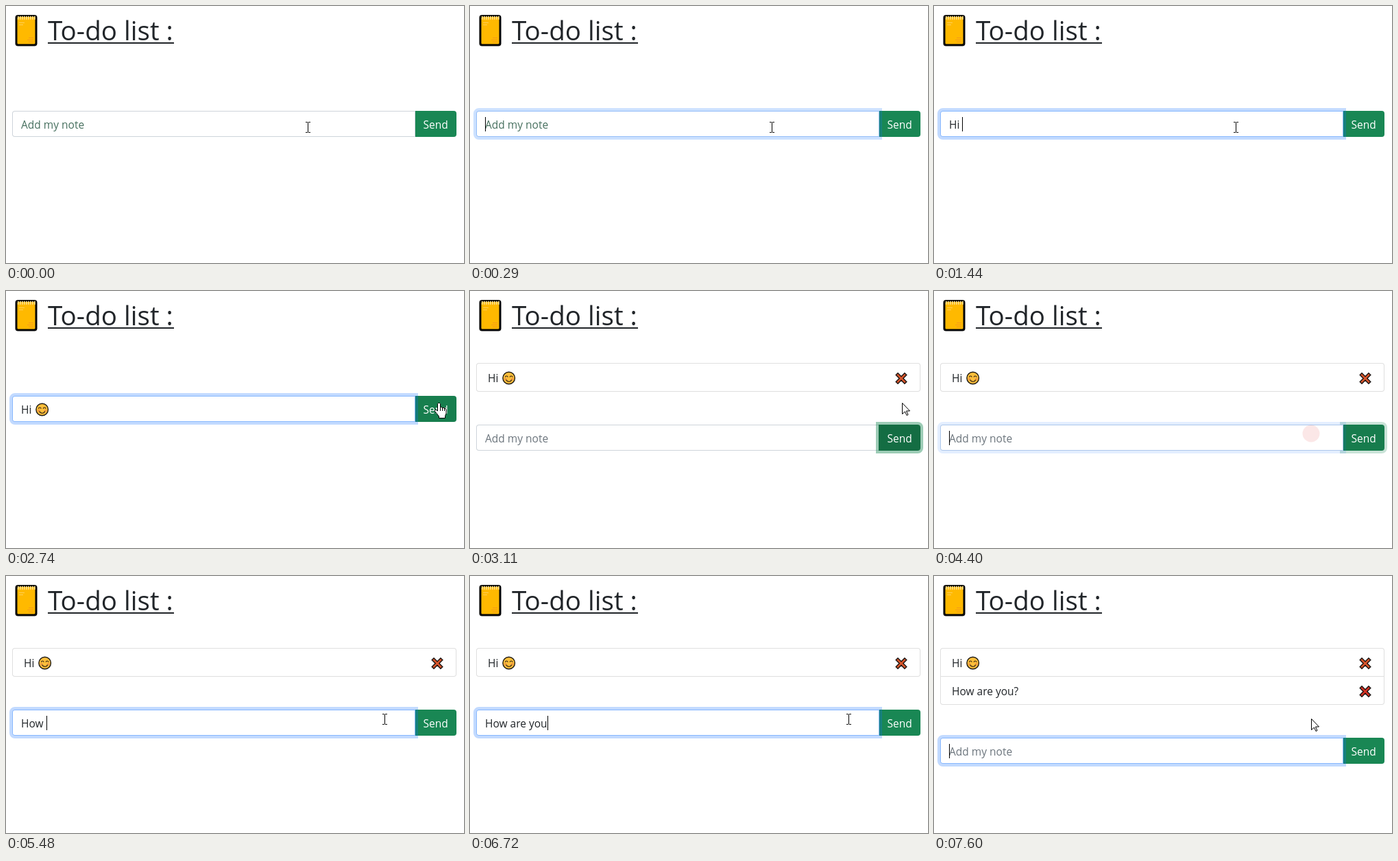
Recreate the animation shown at these times as an HTML page with a canvas. Size 668 px wide and 375 px high, loop 8000 ms.

```html
<!DOCTYPE html>
<html lang="en">
<head>
<meta charset="utf-8">
<title>To-do list</title>
<style>
  html, body { margin: 0; width: 100%; height: 100%; overflow: hidden; background: #fff; }
  canvas { display: block; width: 668px; height: 375px; }
</style>
</head>
<body>
<canvas id="stage" width="668" height="375"></canvas>
<script>
const ctx = document.getElementById('stage').getContext('2d');
const LOOP = 8000;
const FONT = '"Open Sans", "Noto Sans", sans-serif';
const BODY_FONT = `15.5px ${FONT}`;
const INK = '#212529';
const SMILE = '😊';

const FIRST_FOCUS = 180, SEND_DOWN = 2980, FIRST_SENT = 3080;
const SECOND_FOCUS = 4330, SECOND_SENT = 7600;
const CLICKS = [[110, 260], [SEND_DOWN, FIRST_SENT], [4310, 4430]];

const KEYS = [
  [920, 'H'], [1200, 'i'], [1440, ' '], [1770, SMILE],
  [5010, 'H'], [5260, 'o'], [5350, 'w'], [5480, ' '],
  [5600, 'a'], [5780, 'r'], [5950, 'e'], [5980, ' '],
  [6390, 'y'], [6470, 'o'], [6720, 'u'], [7030, '?']
];

const clamp = v => Math.min(1, Math.max(0, v));
const smooth = u => u * u * (3 - 2 * u);
const fade = (t, start, length = 150) => smooth(clamp((t - start) / length));
const mix = (a, b, u) => `rgb(${a.map((v, i) => Math.round(v + (b[i] - v) * u))})`;

function box(x, y, w, h, radii, fill) {
  ctx.beginPath();
  ctx.roundRect(x, y, w, h, radii);
  ctx.fillStyle = fill;
  ctx.fill();
}

function ring(x, y, w, h, radii, color) {
  ctx.beginPath();
  ctx.roundRect(x - 4, y - 4, w + 8, h + 8, radii.map(r => r && r + 4));
  ctx.roundRect(x, y, w, h, radii);
  ctx.fillStyle = color;
  ctx.fill('evenodd');
}

function shape(points, fill, stroke, width = 1) {
  ctx.beginPath();
  points.forEach(([x, y]) => ctx.lineTo(x, y));
  ctx.closePath();
  ctx.fillStyle = fill;
  ctx.fill();
  ctx.strokeStyle = stroke;
  ctx.lineWidth = width;
  ctx.stroke();
}

function arc(x, y, r, from, to, color, width) {
  ctx.beginPath();
  ctx.arc(x, y, r, from, to);
  ctx.strokeStyle = color;
  ctx.lineWidth = width;
  ctx.stroke();
}

function disc(x, y, r, color) {
  ctx.beginPath();
  ctx.arc(x, y, r, 0, Math.PI * 2);
  ctx.fillStyle = color;
  ctx.fill();
}

function smiley(x, y) {
  disc(x, y, 9, '#fdbf3b');
  disc(x - 5, y + 1.8, 2, '#f29a3f');
  disc(x + 5, y + 1.8, 2, '#f29a3f');
  arc(x, y, 8.8, 0, Math.PI * 2, '#1d1a16', 1.4);
  arc(x - 3.4, y - 1.2, 1.8, Math.PI, Math.PI * 2, '#3b2a18', 1.2);
  arc(x + 3.4, y - 1.2, 1.8, Math.PI, Math.PI * 2, '#3b2a18', 1.2);
  arc(x, y + 1, 4.2, 0.35, Math.PI - 0.35, '#3b2a18', 1.3);
}

// Draws text with an optional smiley and returns the x where it ends.
function line(text, x, baseline, color = INK) {
  ctx.font = BODY_FONT;
  ctx.fillStyle = color;
  const plain = text.replace(SMILE, '');
  ctx.fillText(plain, x, baseline);
  x += ctx.measureText(plain).width;
  if (plain === text) return x;
  smiley(x + 11.3, baseline - 6);
  return x + 22.5;
}

function cross(x, y, color) {
  ctx.save();
  ctx.translate(x, y);
  ctx.rotate(Math.PI / 4);
  const a = 2, b = 9;
  shape([[-a, -b], [a, -b], [a, -a], [b, -a], [b, a], [a, a],
         [a, b], [-a, b], [-a, a], [-b, a], [-b, -a], [-a, -a]], color, '#1c1412', 1.4);
  ctx.restore();
}

function notepad() {
  box(13.5, 13, 32, 45.5, 4, '#050505');
  box(16.5, 16, 26, 39.5, 1.5, '#ffb900');
  for (let x = 17; x < 43; x += 3) box(x, 14.5, 1.7, 5.5, 0.8, '#ffe08a');
  ctx.fillStyle = '#ffd05a';
  ctx.fillRect(19, 24, 8, 1);
  ctx.fillRect(19, 27, 6, 1);
  ctx.fillStyle = '#f59a1b';
  ctx.fillRect(33, 46, 7, 1);
  ctx.fillRect(31, 49, 9, 1);
  ctx.fillRect(33, 52, 7, 1);
}

function header() {
  notepad();
  ctx.font = `38.5px ${FONT}`;
  ctx.fillStyle = INK;
  ctx.fillText('To-do list :', 61, 50);
  ctx.fillRect(61, 53, 184, 2);
}

function list(t) {
  if (t < FIRST_SENT) return;
  const two = t >= SECOND_SENT;
  const height = two ? 83 : 42;
  box(9, 105, 648, height, 4, '#dfdfdf');
  box(10, 106, 646, height - 2, 3, '#fff');
  line('Hi ' + SMILE, 26, 133);
  cross(629, 127.5, '#d9552b');
  if (!two) return;
  ctx.fillStyle = '#dfdfdf';
  ctx.fillRect(10, 146, 646, 1);
  line('How are you?', 26, 174);
  cross(629, 168.5, '#d42f22');
}

function caretVisible(t, lastKey) {
  if (t >= SEND_DOWN && t < SECOND_FOCUS) return false;
  const focus = t < SEND_DOWN ? 160 : t < SECOND_SENT ? SECOND_FOCUS : SECOND_SENT;
  return t >= focus && Math.floor((t - Math.max(focus, lastKey)) / 510) % 2 === 0;
}

function input(t, y) {
  const focus = t < SEND_DOWN ? fade(t, FIRST_FOCUS)
    : t < SECOND_FOCUS ? 1 - fade(t, SEND_DOWN - 10, 130) : fade(t, SECOND_FOCUS);
  const corners = [4, 0, 0, 4];
  if (focus) ring(9, y, 588, 38, corners, `rgba(13,110,253,${0.25 * focus})`);
  box(9, y, 588, 38, corners, mix([206, 212, 218], [134, 183, 254], focus));
  box(10, y + 1, 586, 36, [3, 0, 0, 3], '#fff');

  const since = t < FIRST_SENT ? 0 : t < SECOND_SENT ? FIRST_SENT : SECOND_SENT;
  const typed = KEYS.filter(([time]) => time >= since && time <= t);
  const text = typed.map(key => key[1]).join('');
  let caretX = 22;
  if (text) caretX = line(text, 22, y + 26);
  else line('Add my note', 22, y + 26, t < 920 ? '#47705f' : '#6c757d');
  if (caretVisible(t, typed.length ? typed.at(-1)[0] : 0)) {
    ctx.fillStyle = '#000';
    ctx.fillRect(Math.round(caretX), y + 9, 1, 21);
  }
}

function button(t, y) {
  const rest = [25, 135, 84], hover = [21, 115, 71], active = [20, 108, 67];
  const corners = [0, 4, 4, 0];
  const color = t < SEND_DOWN ? mix(rest, hover, fade(t, 2670))
    : t < FIRST_SENT ? mix(hover, active, fade(t, SEND_DOWN, 100))
    : t < SECOND_FOCUS ? mix(active, hover, fade(t, FIRST_SENT))
    : mix(hover, rest, fade(t, SECOND_FOCUS));
  const glow = fade(t, SEND_DOWN - 10, 130) * (1 - fade(t, SECOND_FOCUS));
  if (glow) ring(596, y, 61, 38, corners, `rgba(60,153,110,${0.5 * glow})`);
  box(596, y, 61, 38, corners, color);
  line('Send', 608.5, y + 26, '#fff');
}

function pointerAt(t) {
  if (t < 3470) {
    const p = clamp((t - 2150) / 590) ** 2, q = 1 - p;
    return [438 * q * q + 1120 * p * q + 630 * p * p,
            176 * q * q + 296 * p * q + 163 * p * p].map(Math.round);
  }
  const p = fade(t, 3470, 350);
  return [Math.round(630 - 80 * p), Math.round(163 + 45 * p)];
}

function textCursor(x, y) {
  ctx.fillStyle = '#000';
  ctx.fillRect(x + 2, y - 6, 1, 14);
  for (const row of [y - 7, y + 8]) {
    ctx.fillRect(x - 1, row, 3, 1);
    ctx.fillRect(x + 3, row, 3, 1);
  }
}

function arrowCursor(x, y) {
  const outline = [[0, 0], [0, 16], [4, 12.5], [6.5, 18], [8.5, 17], [6, 11.5], [11, 11.5]];
  shape(outline.map(([a, b]) => [x + a + 0.5, y + b + 0.5]), '#fff', '#000');
}

function handCursor(x, y) {
  const outline = [[-1, 1], [0, 0], [2, 0], [3, 1], [3, 6], [5, 6], [6, 7], [8, 7], [9, 8],
    [10.5, 8], [11.5, 9.5], [11.5, 15], [10, 19], [10, 22], [1, 22], [1, 19.5],
    [-2, 15.5], [-5, 12], [-5, 10.5], [-3.5, 9.5], [-1, 11.5]];
  shape(outline.map(([a, b]) => [x + a + 0.5, y + b + 0.5]), '#fff', '#000');
  ctx.fillStyle = '#000';
  for (const dx of [3, 6, 9]) ctx.fillRect(x + dx, y + 7, 1, 5);
}

function pointer(t, inputY) {
  const [x, y] = pointerAt(t);
  if (CLICKS.some(([from, to]) => t >= from && t < to)) {
    disc(x, y, 12.5, 'rgba(220,40,40,0.11)');
    return;
  }
  const inRow = y >= inputY && y < inputY + 38;
  if (!inRow) arrowCursor(x, y);
  else if (x < 597) textCursor(x, y);
  else handCursor(x, y);
}

function draw(t) {
  ctx.fillStyle = '#fff';
  ctx.fillRect(0, 0, 668, 375);
  header();
  list(t);
  const y = t < FIRST_SENT ? 153 : t < SECOND_SENT ? 195 : 236;
  const layers = [button, input];
  if (t >= SEND_DOWN && t < SECOND_FOCUS) layers.reverse();
  layers.forEach(layer => layer(t, y));
  pointer(t, y);
}

const start = performance.now();
function tick() {
  draw((performance.now() - start) % LOOP);
  requestAnimationFrame(tick);
}
tick();
</script>
</body>
</html>
```
